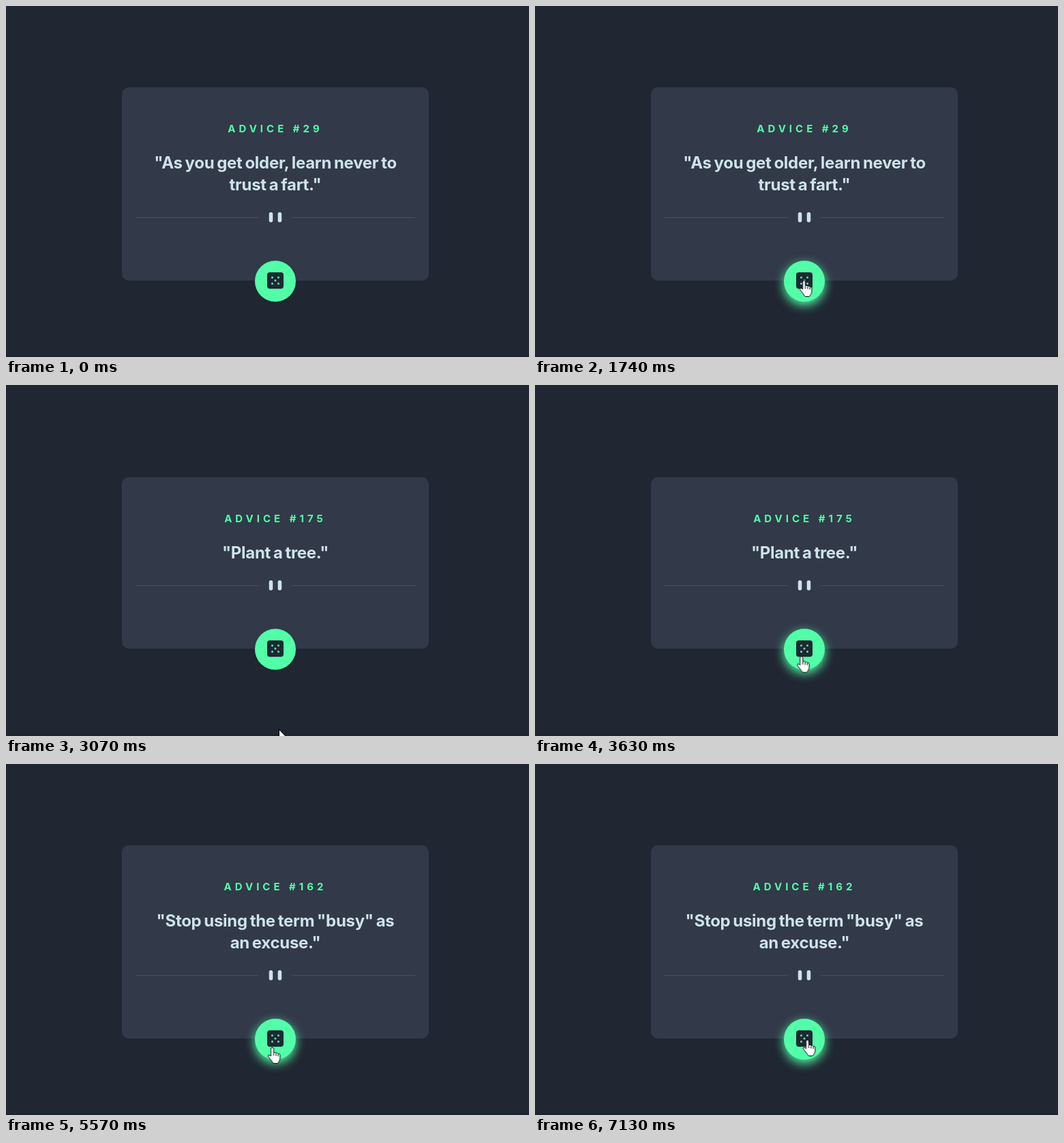
Animation, 767 px wide and 514 px high, one loop 8000 ms. Source, as an HTML page:

```html
<!DOCTYPE html>
<html lang="en">
<head>
<meta charset="utf-8">
<title>Advice generator</title>
<style>
  html, body { margin: 0; width: 100%; height: 100%; overflow: hidden; background: #202632; }
  svg { display: block; width: 767px; height: 514px; }
  text { font-family: Inter, "Open Sans", sans-serif; font-weight: 700; text-anchor: middle; }
  .label { font-size: 15px; letter-spacing: 5px; fill: #52ffa8; }
  .quote { font-size: 24px; letter-spacing: -.3px; word-spacing: -1.5px; fill: #cee3e9; }
  .card { fill: #323949; }
  .glow { fill: #52ffa8; filter: blur(7.5px); }

  /* 1% = 80 ms */
  .first, .second, .third, .footer, .hover, .away, .click { animation: 8s step-end infinite; }
  .first { animation-name: first; }
  .second { animation-name: second; }
  .third { animation-name: third; }
  .footer { animation-name: lift; }
  .hover { animation-name: hover; }
  .away { animation-name: away; }
  .click { animation-name: click; }
  .cursor { animation: move 8s linear infinite; }

  @keyframes first { 0% { opacity: 1 } 26%, 100% { opacity: 0 } }
  @keyframes second { 0%, 61.375%, 100% { opacity: 0 } 26% { opacity: 1 } }
  @keyframes third { 0% { opacity: 0 } 61.375%, 100% { opacity: 1 } }
  @keyframes lift {
    0%, 61.375%, 100% { transform: translateY(0) }
    26% { transform: translateY(-16px) }
  }
  @keyframes hover {
    0%, 34.25%, 71.375% { opacity: 0 }
    9.25%, 43.625%, 83.75%, 100% { opacity: 1 }
  }
  @keyframes away {
    0%, 34.25%, 71.375% { opacity: 1 }
    9.25%, 43.625%, 83.75%, 100% { opacity: 0 }
  }
  @keyframes click {
    0%, 21.75%, 58.75%, 100% { opacity: 0 }
    20.125%, 57.125% { opacity: 1 }
  }
  /* The pointer advances in ticks of about 67 ms */
  @keyframes move {
    0% { transform: translate(606px, 540px); animation-timing-function: step-end }
    4.125% { transform: translate(598px, 497px); animation-timing-function: steps(4) }
    7.5% { transform: translate(435px, 425px); animation-timing-function: steps(5) }
    11.75% { transform: translate(394.5px, 402px) }
    32.5% { transform: translate(394.5px, 402px); animation-timing-function: steps(7) }
    38.375% { transform: translate(400px, 504px); animation-timing-function: steps(2) }
    40% { transform: translate(399px, 512px); animation-timing-function: steps(4) }
    43.625% { transform: translate(391px, 412px); animation-timing-function: steps(3) }
    46.125% { transform: translate(390.5px, 390px); animation-timing-function: step-end }
    69.625% { transform: translate(390.5px, 415px); animation-timing-function: steps(5) }
    73.875% { transform: translate(396px, 471px); animation-timing-function: step-end }
    78% { transform: translate(396.5px, 472px) }
    79.625% { transform: translate(396.5px, 472px); animation-timing-function: steps(5) }
    83.75% { transform: translate(398px, 425px); animation-timing-function: steps(6) }
    89.125%, 100% { transform: translate(399.5px, 404px) }
  }
</style>
</head>
<body>
<svg viewBox="0 0 767 514">
  <rect width="767" height="514" fill="#202632"/>
  <rect y="511" width="767" height="3" fill="#1e232f"/>

  <g class="first">
    <rect class="card" x="170" y="119" width="450" height="283" rx="10"/>
    <text class="label" x="395" y="185">ADVICE #29</text>
    <text class="quote" x="395" y="238">"As you get older, learn never to</text>
    <text class="quote" x="395" y="270">trust a fart."</text>
  </g>
  <g class="second">
    <rect class="card" x="170" y="135" width="450" height="251" rx="10"/>
    <text class="label" x="395" y="201">ADVICE #175</text>
    <text class="quote" x="395" y="254">"Plant a tree."</text>
  </g>
  <g class="third">
    <rect class="card" x="170" y="119" width="450" height="283" rx="10"/>
    <text class="label" x="395" y="185">ADVICE #162</text>
    <text class="quote" x="395" y="238">"Stop using the term "busy" as</text>
    <text class="quote" x="395" y="270">an excuse."</text>
  </g>

  <g class="footer">
    <g transform="translate(190 302) scale(.9234)">
      <path d="M0 8h196v1H0zM248 8h196v1H248z" fill="#4f5d74"/>
      <g fill="#cee3e9">
        <rect x="212" width="6" height="16" rx="3"/>
        <rect x="226" width="6" height="16" rx="3"/>
      </g>
    </g>
    <g class="hover"><circle class="glow" cx="395" cy="408" r="30"/></g>
    <circle cx="395" cy="403" r="30" fill="#52ffa8"/>
    <g transform="translate(383 390)">
      <rect width="24" height="24" rx="4" fill="#202733"/>
      <path d="M7.5 7.5h0M16.5 7.5h0M12 12h0M7.5 16.5h0M16.5 16.5h0"
            stroke="#52ffa8" stroke-width="3" stroke-linecap="round"/>
    </g>
  </g>

  <g class="cursor" stroke="#000" stroke-linejoin="round">
    <path class="away" fill="#fff" d="M.5 .5v16l3.7-3.5 2.6 6 2.4-1-2.6-5.8h5.1z"/>
    <g class="hover">
      <path fill="#fff" d="M-2 13V2a2 2 0 0 1 4 0v5.5q2.6-1 3.4.8 2.4-.8 3.2 1 2.6-.6 2.8 1.7v5q0 2-1.5 4.5-1 3-3 3h-4q-2 0-2.5-1.8l-6-8q-1.2-2.2.6-2.8 1.6 0 3 2.1z"/>
      <path fill="none" d="M2 8v4M5.4 9v3.5M8.6 10v3"/>
    </g>
    <circle class="click" r="12" fill="#ff0" fill-opacity=".47" stroke="none"/>
  </g>
</svg>
</body>
</html>
```
